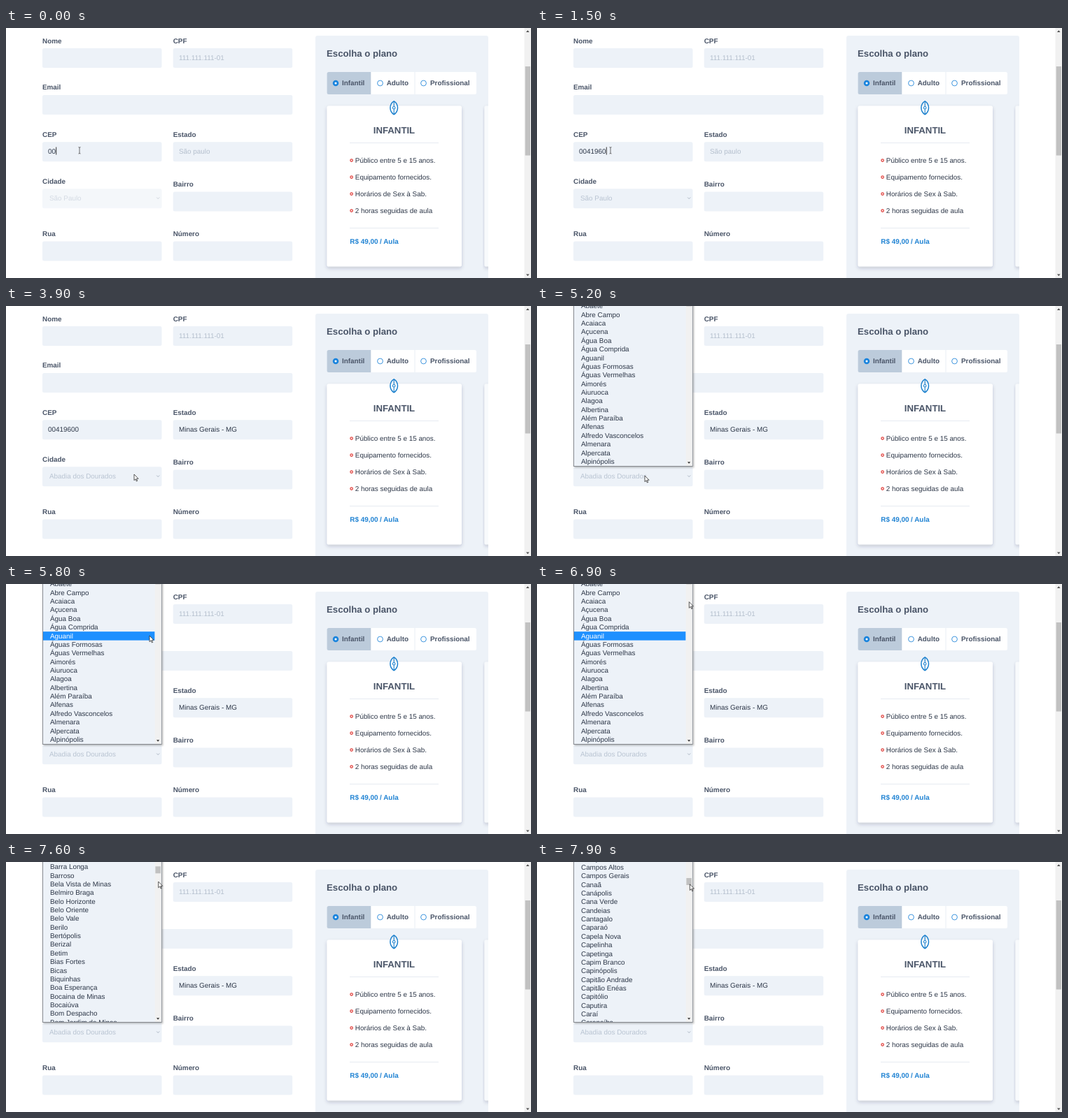
Write an HTML page that moves like this. It is 750 px wide and 358 px high and loops after 8000 ms.

```html
<!DOCTYPE html>
<html lang="pt-BR">
<head>
<meta charset="utf-8">
<title>Cadastro</title>
<style>
  html, body { margin: 0; width: 100%; height: 100%; overflow: hidden; background: #fff; }
  svg { display: block; width: 750px; height: 358px; }
  text {
    font: 9.9px "Liberation Sans", Arial, sans-serif;
    fill: #2d3748; white-space: pre; text-rendering: geometricPrecision;
  }
  .b { font-weight: 700; fill: #4a5568; }
  .hint { fill: #b4bfcd; }
  .off { fill: #b9c4d2; }
  .field { fill: #edf2f8; }
  .title, .plan { font-size: 13.2px; }
  .plan { text-anchor: middle; }
  .price { fill: #2083d3; }
  .radio { fill: #fff; stroke: #3d95de; }
  .dot { fill: #fff; stroke: #e0433f; stroke-width: 1.3; }
  .icon { fill: none; stroke: #1b80cd; stroke-width: 1.5; }
  .hot { fill: #fff; }
</style>
</head>
<body>
<svg viewBox="0 0 750 358">
  <defs>
    <filter id="soft" x="-10%" y="-10%" width="120%" height="125%">
      <feDropShadow dx="0" dy="2.5" stdDeviation="2.5" flood-color="#1a2a44" flood-opacity=".2"/>
    </filter>
    <filter id="drop" x="-10%" y="-10%" width="120%" height="120%">
      <feDropShadow dx="1.5" dy="1.5" stdDeviation="1" flood-opacity=".25"/>
    </filter>
    <clipPath id="panelClip"><rect x="442" y="0" width="247" height="358"/></clipPath>
    <clipPath id="listClip"><rect x="53" y="0" width="169" height="229"/></clipPath>
  </defs>

  <g id="form"></g>
  <text id="cep" x="60" y="179.6"></text>
  <rect id="caret" y="170.5" width=".9" height="11" fill="#222"/>
  <text class="hint" x="247" y="45.7">111.111.111-01</text>
  <text id="state" x="247" y="179.6"></text>
  <g id="select">
    <rect class="field" x="52" y="230.2" width="170.5" height="28" rx="2.5"/>
    <text id="city" class="off" x="62" y="247"></text>
    <path d="M215.2 242.6l2 2 2-2" fill="none" stroke="#aab4c2"/>
  </g>

  <path d="M442 358V14q0-3 3-3h241q3 0 3 3v344z" fill="#edf2f8"/>
  <text class="b title" x="458" y="41">Escolha o plano</text>
  <rect x="458.5" y="63" width="213.5" height="32" rx="2.5" fill="#fff"/>
  <path d="M521.3 63H461q-2.5 0-2.5 2.5v27q0 2.5 2.5 2.5h60.3z" fill="#bccbdb"/>
  <path d="M584 63v32" stroke="#e8eef5"/>
  <circle cx="471" cy="79" r="2.9" fill="#fff" stroke="#1a84dd" stroke-width="2.7"/>
  <circle class="radio" cx="534.5" cy="79" r="3.9"/>
  <circle class="radio" cx="596.5" cy="79" r="3.9"/>
  <text class="b" x="480" y="82.4">Infantil</text>
  <text class="b" x="543.7" y="82.4">Adulto</text>
  <text class="b" x="606" y="82.4">Profissional</text>

  <g clip-path="url(#panelClip)">
    <rect x="683.5" y="111.5" width="20" height="230" rx="2.5" fill="#f8fafc" filter="url(#soft)"/>
    <rect x="458.5" y="111.5" width="192.5" height="230" rx="2.5" fill="#fff" filter="url(#soft)"/>
  </g>
  <g class="icon">
    <path d="M554.2 104.8c-3.5 2-5.3 5.5-5.3 9.5s1.8 7.5 5.3 9.5c3.5-2 5.3-5.5 5.3-9.5s-1.8-7.5-5.3-9.5z"/>
    <path d="M554.2 105v7m0 4.5v7" stroke-width="1.1"/>
    <circle cx="554.2" cy="114.3" r="1.8" stroke-width="1.1"/>
  </g>
  <text class="b plan" x="554.5" y="150.7">INFANTIL</text>
  <path d="M491 164.5h127M491 286.5h127" stroke="#e6ebf1"/>
  <g id="perks"></g>
  <text class="b price" x="491.3" y="309">R$ 49,00 / Aula</text>

  <rect x="740.5" width="9.5" height="358" fill="#f1f1f1"/>
  <rect x="741.7" y="55" width="7.3" height="127.5" fill="#c1c1c1"/>
  <path d="M743 6l2.3-2.7 2.3 2.7zM743 352.5h4.6l-2.3 2.7z" fill="#505050"/>

  <g id="popup">
    <rect x="52.5" y="-20" width="169.7" height="249.5" fill="#edf2f8" stroke="#85898f" filter="url(#drop)"/>
    <g clip-path="url(#listClip)">
      <g id="list"><rect id="mark" x="53" width="159.5" height="12.5" fill="#1e90ff"/></g>
      <rect x="212.7" width="9" height="229" fill="#f1f1f1"/>
      <rect id="thumb" x="213.4" width="7.4" height="10" fill="#c1c1c1"/>
      <path d="M215 223.3h4.2l-2.1 2.4z" fill="#333"/>
    </g>
  </g>

  <path id="beam" d="M-1.5-4.7q1.5 0 1.5 1v7.4q0 1-1.5 1M1.5-4.7q-1.5 0-1.5 1M0 3.7q0 1 1.5 1" fill="none" stroke="#444" stroke-width=".8"/>
  <path id="arrow" d="M0 0v8.7l2-1.9 1.4 3.2 1.3-.6-1.4-3.1h2.8z" fill="#fff" stroke="#222" stroke-width=".75"/>
</svg>
<script>
const $ = id => document.getElementById(id);

function add(parent, tag, attrs, text = '') {
  const el = document.createElementNS('http://www.w3.org/2000/svg', tag);
  for (const k in attrs) el.setAttribute(k, attrs[k]);
  el.textContent = text;
  return parent.appendChild(el);
}

// label, x, label baseline, field top, field width
[
  ['Nome', 52, 21.5, 29, 170.5], ['CPF', 238.7, 21.5, 29, 170.5],
  ['Email', 52, 88.4, 96, 357.3],
  ['CEP', 52, 155.7, 163.2, 170.5], ['Estado', 238.7, 155.7, 163.2, 170.5],
  ['Cidade', 52, 222.8], ['Bairro', 238.7, 226.8, 234.6, 170.5],
  ['Rua', 52, 298, 305.6, 170.5], ['Número', 238.7, 298, 305.6, 170.5]
].forEach(([label, x, base, y, width]) => {
  add($('form'), 'text', { class: 'b', x, y: base }, label);
  if (width) add($('form'), 'rect', { class: 'field', x, y, width, height: 28, rx: 2.5 });
});

['Público entre 5 e 15 anos.', 'Equipamento fornecidos.', 'Horários de Sex à Sab.', '2 horas seguidas de aula']
  .forEach((perk, i) => {
    const y = 192.6 + i * 24;
    add($('perks'), 'circle', { class: 'dot', cx: 493.6, cy: y - 3, r: 1.7 });
    add($('perks'), 'text', { x: 498.8, y }, perk);
  });

const cities = `Abaeté,Abre Campo,Acaiaca,Açucena,Água Boa,Água Comprida,Aguanil,Águas Formosas,Águas Vermelhas,Aimorés,Aiuruoca,Alagoa,Albertina,Além Paraíba,Alfenas,Alfredo Vasconcelos,Almenara,Alpercata,Alpinópolis,Alterosa,Alto Caparaó,Alto Rio Doce,Alvarenga,Alvinópolis,Alvorada de Minas,Amparo do Serra,Andradas,Cachoeira de Pajeú,Andrelândia,Angelândia,Antônio Carlos,Antônio Dias,Antônio Prado de Minas,Araçaí,Aracitaba,Araçuaí,Araguari,Arantina,Araponga,Araporã,Arapuá,Araújos,Araxá,Arceburgo,Arcos,Areado,Argirita,Aricanduva,Arinos,Astolfo Dutra,Ataléia,Augusto de Lima,Baependi,Baldim,Bambuí,Bandeira,Bandeira do Sul,Barão de Cocais,Barão de Monte Alto,Barbacena,Barra Longa,Barroso,Bela Vista de Minas,Belmiro Braga,Belo Horizonte,Belo Oriente,Belo Vale,Berilo,Bertópolis,Berizal,Betim,Bias Fortes,Bicas,Biquinhas,Boa Esperança,Bocaina de Minas,Bocaiúva,Bom Despacho,Bom Jardim de Minas,Bom Jesus da Penha,Bom Jesus do Amparo,Bom Jesus do Galho,Bom Repouso,Bom Sucesso,Bonfim,Bonfinópolis de Minas,Bonito de Minas,Borda da Mata,Botelhos,Botumirim,Brasilândia de Minas,Brasília de Minas,Brás Pires,Braúnas,Brazópolis,Brumadinho,Bueno Brandão,Buenópolis,Bugre,Buritis,Buritizeiro,Cabeceira Grande,Cabo Verde,Cachoeira da Prata,Cachoeira de Minas,Cachoeira Dourada,Caetanópolis,Caeté,Caiana,Cajuri,Caldas,Camacho,Camanducaia,Cambuí,Cambuquira,Campanário,Campanha,Campestre,Campina Verde,Campo Azul,Campo Belo,Campo do Meio,Campo Florido,Campos Altos,Campos Gerais,Canaã,Canápolis,Cana Verde,Candeias,Cantagalo,Caparaó,Capela Nova,Capelinha,Capetinga,Capim Branco,Capinópolis,Capitão Andrade,Capitão Enéas,Capitólio,Caputira,Caraí,Caranaíba`.split(',');
const ROW = 12.36, TOP = -6, PAGE = 216.1;
const items = cities.map((name, i) => add($('list'), 'text', { x: 63, y: 3.4 + i * ROW }, name));

const code = '00419600';
const keyTimes = [300, 600, 900, 1200, 1500, 1900];

// time, x, y of the pointer
const path = [
  [0, 105, 175.3], [2400, 105, 175.3], [2700, 125, 150], [3100, 148, 142], [3400, 148, 142],
  [3900, 183, 241], [4300, 162, 244], [4600, 154, 243], [5400, 154, 243], [5500, 156, 226],
  [5800, 205, 74], [5900, 224, 26], [6100, 224, 26], [6400, 217.3, 25.6],
  [7400, 217.3, 25.6], [7900, 218.3, 31.8]
];
// time, pages scrolled
const scroll = [[0, 0], [7100, 0], [7200, .4], [7300, .85], [7400, 1], [7500, 1.8], [7700, 5], [7800, 6.5], [7900, 7]];

function at(keys, t, col = 1) {
  const n = keys.findIndex(k => k[0] > t);
  if (n < 0) return keys[keys.length - 1][col];
  const a = keys[n - 1], b = keys[n];
  return a[col] + (b[col] - a[col]) * (t - a[0]) / (b[0] - a[0]);
}

const show = (id, on) => $(id).setAttribute('visibility', on ? 'visible' : 'hidden');

// last row the pointer passed over
function hovered(t) {
  for (let s = t; s >= 5500; s -= 100) {
    const x = at(path, s), y = at(path, s, 2);
    if (x < 212 && y < 229) return Math.floor((y - TOP) / ROW);
  }
  return -1;
}

function draw(t) {
  const typed = 2 + keyTimes.filter(k => t >= k).length;
  const loaded = t >= 2900, open = t >= 5200;
  const x = at(path, t), y = at(path, t, 2);

  $('cep').textContent = code.slice(0, typed);
  $('caret').setAttribute('x', 60 + typed * 5.5 + .3);
  show('caret', t < 2400);
  $('state').textContent = loaded ? 'Minas Gerais - MG' : 'São paulo';
  $('state').setAttribute('class', loaded ? '' : 'hint');
  $('select').setAttribute('opacity', t < 500 ? .6 : 1);
  $('city').textContent = loaded ? 'Abadia dos Dourados' : 'São Paulo';

  show('popup', open);
  const hot = open ? hovered(t) : -1, pages = at(scroll, t);
  $('mark').setAttribute('y', TOP + hot * ROW);
  $('mark').setAttribute('opacity', hot < 0 ? 0 : 1);
  items.forEach((el, i) => el.setAttribute('class', i === hot ? 'hot' : ''));
  $('list').setAttribute('transform', `translate(0 ${-pages * PAGE})`);
  $('thumb').setAttribute('y', -9.5 + pages * 4.64);

  const beam = t < 2500;
  show('beam', beam);
  show('arrow', !beam);
  $(beam ? 'beam' : 'arrow').setAttribute('transform', `translate(${x} ${y})`);
}

function tick(now) {
  draw(Math.floor(now % 8000 / 100) * 100);
  requestAnimationFrame(tick);
}
draw(0);
requestAnimationFrame(tick);
</script>
</body>
</html>
```
